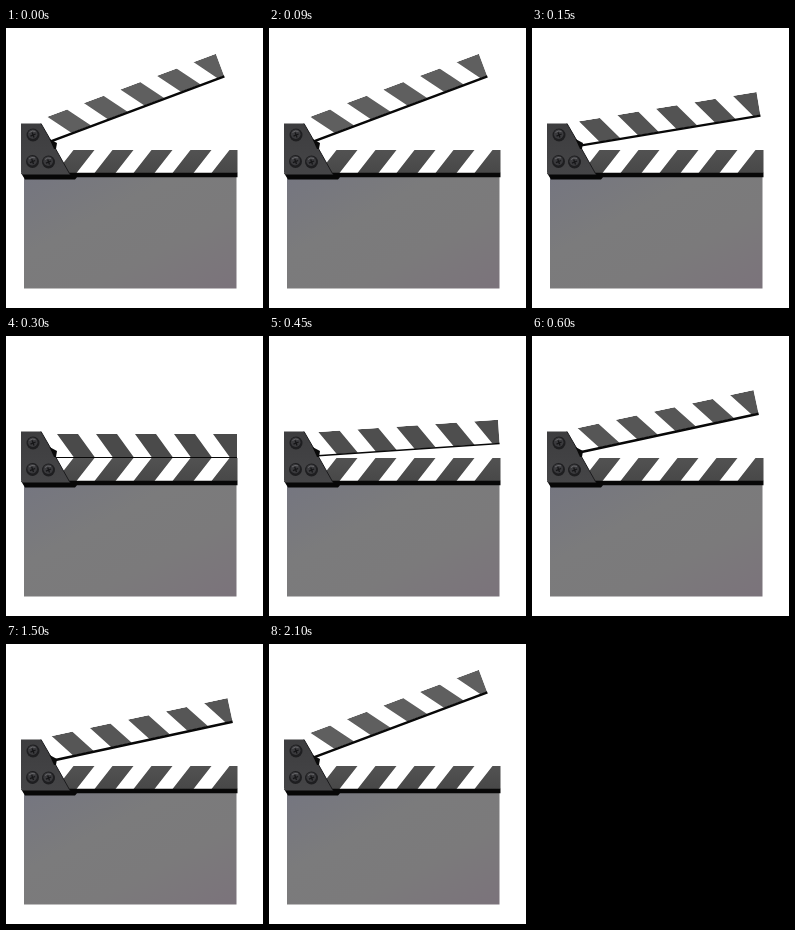
An HTML page that plays this animation: 257 by 280 pixels, repeating every 2.2 s.

```html
<!DOCTYPE html>
<html>
<head>
<meta charset="utf-8">
<title>Clapperboard</title>
<style>
html, body { margin: 0; width: 100%; height: 100%; overflow: hidden; background: #fff; }
svg { display: block; width: 257px; height: 280px; }
</style>
</head>
<body>
<svg viewBox="0 0 257 280">
  <defs>
    <linearGradient id="slate" x1="0" y1="0" x2="1" y2="1">
      <stop offset="0" stop-color="#757680"/>
      <stop offset=".35" stop-color="#7b7b7c"/>
      <stop offset=".65" stop-color="#7b7a7b"/>
      <stop offset="1" stop-color="#7b737b"/>
    </linearGradient>
    <linearGradient id="metal" x1="0" y1="0" x2="0" y2="1">
      <stop offset="0" stop-color="#3d3d3f"/>
      <stop offset="1" stop-color="#454547"/>
    </linearGradient>
    <linearGradient id="paint" gradientUnits="userSpaceOnUse" x1="0" y1="122" x2="0" y2="145">
      <stop offset="0" stop-color="#525252"/>
      <stop offset="1" stop-color="#484848"/>
    </linearGradient>
    <clipPath id="armClip"><path d="M36 98H231V121.5H44Z"/></clipPath>
    <clipPath id="barClip"><path d="M44 122H231.500V145H44Z"/></clipPath>
    <g id="bolt">
      <circle r="6.5" fill="#1e1e20"/>
      <circle cx="-.3" cy="-.8" r="4.8" fill="#3a3a3d"/>
      <path d="M-3.5 -2.5Q-1 -5 2.5 -3.6" fill="none" stroke="#68686b"/>
      <path d="M-2.5 1.2L2.6 -1M-.8 -2.5L1 2.5" stroke="#161618" stroke-width="1.3"/>
    </g>
  </defs>

  <path d="M18 149H230.500V260.500H18Z" fill="url(#slate)"/>

  <g id="arm">
    <path d="M36 98H231V121.5H44Z" fill="#fff"/>
    <path id="armStripes" clip-path="url(#armClip)"/>
    <path id="edge" fill="#080808"/>
  </g>

  <path d="M44 122H231.500V145H44Z" fill="#fff"/>
  <path id="barStripes" clip-path="url(#barClip)" fill="url(#paint)"/>
  <path d="M15 144.800H231.500V149.200H71L69 151.500H19L15 145Z" fill="#070707"/>
  <path d="M15 95.500H35L48 118L64 146.500H16L15 144Z" fill="url(#metal)"/>
  <path d="M35 95.500L48 118L64 146.500" fill="none" stroke="#1b1b1d"/>
  <path d="M43.500 111L51 115L50 121H48Z" fill="#0a0a0a"/>
  <use href="#bolt" x="27" y="107"/>
  <use href="#bolt" x="26.500" y="133.500"/>
  <use href="#bolt" x="42.500" y="134"/>
</svg>
<script>
const byId = id => document.getElementById(id);

// Slanted stripes; the last one fills the rest of the stick.
const stripes = (x, top, bottom, slant) => Array.from({ length: 5 }, (_, i) => {
  const width = i < 4 ? 21 : 40;
  return `M${x + i * 39} ${top}h${width}l${slant} ${bottom - top}h${-width}Z`;
}).join('');

byId('armStripes').setAttribute('d', stripes(51, 98, 121.5, 17));
byId('barStripes').setAttribute('d', stripes(67.5, 122, 145, -18));

// Each pose holds until its end time, in ms.
const poses = [[150, 20.5], [300, 9.4], [450, 0], [600, 3.9], [2100, 12.2], [2200, 20.5]];
const start = performance.now();

function draw() {
  const time = (performance.now() - start) % 2200;
  const angle = poses.find(([end]) => time < end)[1];
  const grey = 74 + angle;
  byId('arm').setAttribute('transform', `rotate(${-angle} 20.5 120.3)`);
  // As the arm opens it catches more light and shows its underside.
  byId('armStripes').setAttribute('fill', `rgb(${grey},${grey},${grey})`);
  byId('edge').setAttribute('d', `M45 121H231v${1 + Math.min(angle, 12) / 8}H45Z`);
  requestAnimationFrame(draw);
}
draw();
</script>
</body>
</html>
```
